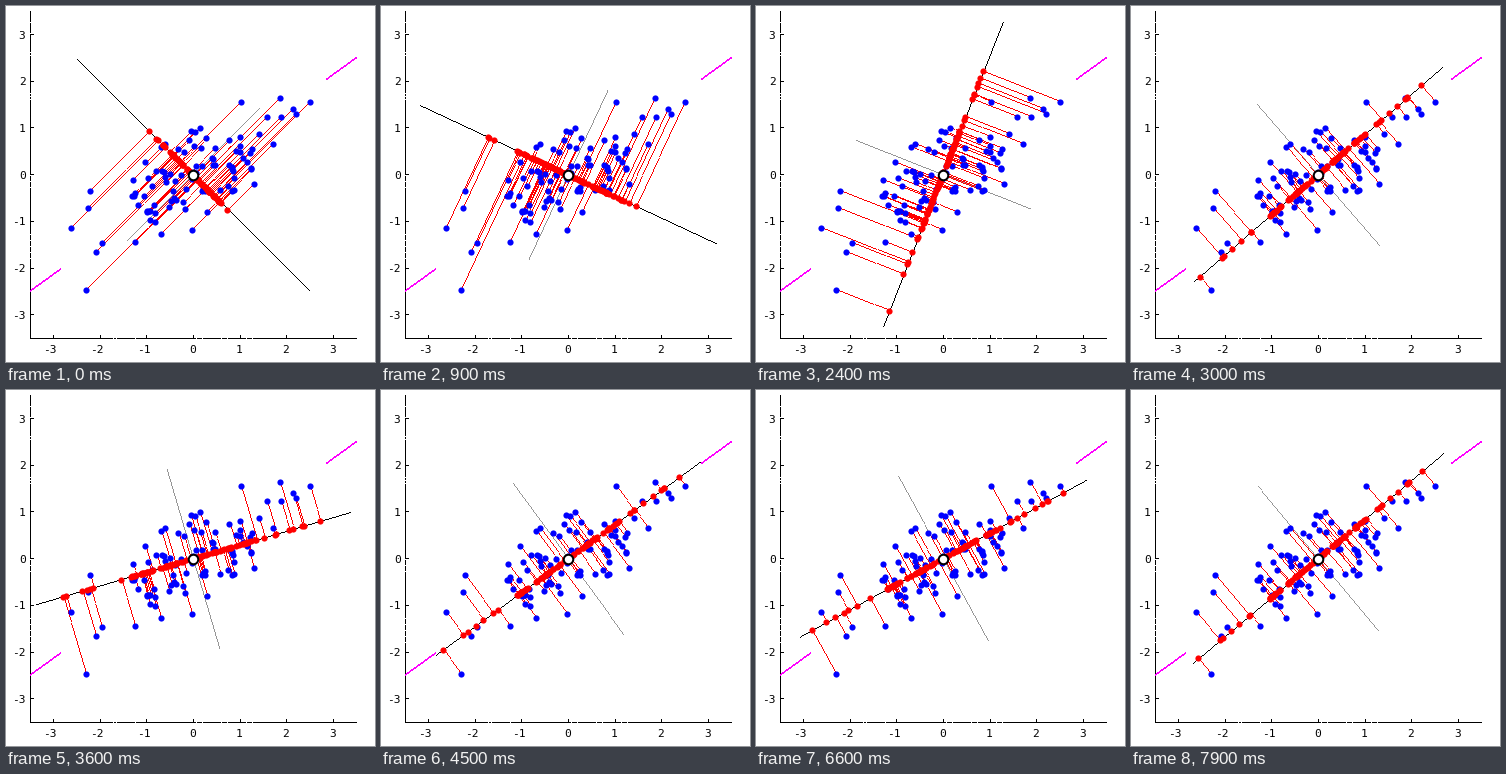
Recreate the animation shown at these times as a matplotlib script. Size 369 by 356 pixels, loop 8 s.

```python
import numpy as np
import matplotlib.pyplot as plt
from matplotlib.animation import FuncAnimation

W, H, DPI = 369, 356, 100
PX = 72 / DPI                                   # one pixel in points
CENTRE, UNIT = np.array([186.5, 168.7]), 46.7   # data origin and scale in pixels
REST, PULL, DAMP = 35.5, 65.9, 0.93


def direction(deg):
    a = np.radians(deg)
    return np.array([np.cos(a), -np.sin(a)])


def cloud(n, length, breadth, seed):
    """Random points in an ellipse that lies along the rest angle."""
    rng = np.random.default_rng(seed)
    r, turn = rng.random(n) ** 0.55, rng.uniform(0, 2 * np.pi, n)
    return (CENTRE + np.outer(length * r * np.cos(turn), direction(REST))
            + np.outer(breadth * r * np.sin(turn), direction(REST + 90)))


def swing(steps):
    """Angles of a damped pendulum pulled towards REST."""
    angle, speed, out = -45.0, 0.0, []
    for _ in range(steps):
        out.append(angle)
        pull = PULL * np.sin(np.radians(2 * (REST - angle)))
        speed = DAMP * (speed + pull)
        angle += speed / 40
    return out


def trace(start, end):
    """Pixel centres of a crisp one-pixel line."""
    start, end = np.array(start, float), np.array(end, float)
    n = int(np.abs(end - start).max()) + 1
    return np.floor(np.linspace(start, end, n)) + 0.5


def spoke(deg, r0, r1):
    d = direction(deg) * UNIT
    return trace(CENTRE + r0 * d, CENTRE + r1 * d)


outliers = np.array([(234, 95), (273, 91), (303, 95), (286, 102), (289, 107),
                     (274, 110), (260, 110), (252, 127), (266, 137),
                     (247, 177), (83, 184), (81, 201), (64, 221), (89, 245),
                     (95, 236), (79, 283), (128, 235), (154, 227), (158, 137),
                     (193, 121), (185, 223), (225, 184), (126, 173)]) + 0.5
points = np.vstack([outliers, cloud(75, 72, 42, seed=7)])

fig = plt.figure(figsize=(W / DPI, H / DPI), dpi=DPI, facecolor="white")
ax = fig.add_axes([0, 0, 1, 1])
ax.set(xlim=(0, W), ylim=(H, 0))
ax.axis("off")


def pixels(color, z, xy=np.empty((0, 2))):
    return ax.plot(*xy.T, ",", color=color, zorder=z)[0]


def dots(xy, color, z):
    return ax.plot(*xy.T, "o", ms=6.2 * PX, color=color, mew=0, zorder=z,
                   antialiased=False)[0]


def label(x, y, text, ha):
    ax.text(x, y, text, ha=ha, va="center_baseline", color="black",
            family="DejaVu Sans Mono", size=11.3 * PX)


# Axes with ticks
left, right, top, bottom = 23, 349, 5, 332
pixels("black", 1, trace((left, top), (left, bottom)))
pixels("black", 1, trace((left, bottom), (right, bottom)))
for n in range(-3, 4):
    x, y = CENTRE + n * UNIT * np.array([1, -1])
    pixels("black", 1, trace((x, bottom - 3), (x, bottom)))
    pixels("black", 1, trace((left, y), (left + 3, y)))
    label(x - (2.5 if n < 0 else 0), 343, str(n), "center")
    label(19.5, y, str(n), "right")

for r0, r1 in ((-4.3, -3.5), (3.5, 4.3)):
    strip = spoke(REST, r0, r1)
    pixels("magenta", 1, np.vstack([strip, strip - (0, 1)]))

cross = pixels("#969696", 1)
axis = pixels("black", 2)
links = pixels("red", 3)
dots(points, "blue", 4)
feet = dots(points, "red", 5)
ax.plot(*CENTRE, "o", ms=9.5 * PX, mfc="white", mec="black", mew=2 * PX,
        zorder=6)

angles = swing(79)


def draw(i):
    deg = angles[max(i - 1, 0)]
    d = direction(deg)
    proj = CENTRE + np.outer((points - CENTRE) @ d, d)
    axis.set_data(*spoke(deg, -3.5, 3.5).T)
    cross.set_data(*spoke(deg + 90, -2, 2).T)
    links.set_data(*np.vstack([trace(p, q) for p, q in zip(points, proj)]).T)
    feet.set_data(*proj.T)
    return axis, cross, links, feet


anim = FuncAnimation(fig, draw, frames=80, interval=100, repeat=True,
                     repeat_delay=0, blit=False)
plt.show()
```
